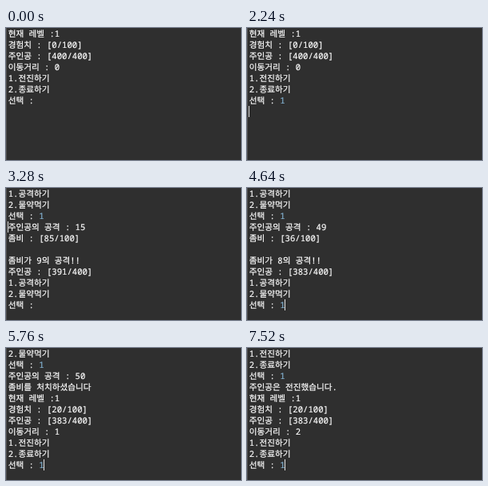
An HTML page for the animation above (8000 ms loop, 294x166 px).

```html
<!DOCTYPE html>
<html lang="ko">
<head>
<meta charset="utf-8">
<title>콘솔 게임</title>
<style>
  html, body { margin: 0; width: 100%; height: 100%; overflow: hidden; background: #2f2f2f; }
  #console {
    position: relative; width: 294px; height: 166px; overflow: hidden; background: #2f2f2f; color: #fff;
    font: 500 10.6px/14px "Noto Sans Mono", "Noto Sans CJK KR", "Noto Sans CJK", monospace;
    text-rendering: geometricPrecision;
    -webkit-text-stroke: 0.2px;
  }
  #console::before { content: ""; position: absolute; inset: 0 auto 0 0; width: 1px; background: #515151; }
  #log { position: absolute; left: 2.7px; }
  .row { height: 14px; white-space: pre; }
  .answer { color: #84b4d4; }
  #caret { position: absolute; width: 1px; height: 14px; background: #e4e4e4; }
</style>
</head>
<body>
<div id="console"><div id="log"></div><div id="caret"></div></div>
<script>
const LOOP = 8000, TICK = 80, BLINK = 560;
const LINE = 14, ROWS_ABOVE_PROMPT = 10, TEXT_DROP = 0.8;
const LINE_START = 2, PROMPT_END = 47, MENU_END = 54;
const PROMPT = "선택 : ";

const hero = { hp: 400, exp: 0, distance: 0 };
const zombie = { hp: 100 };

const status = () => [
  "현재 레벨 :1", `경험치 : [${hero.exp}/100]`, `주인공 : [${hero.hp}/400]`,
  `이동거리 : ${hero.distance}`, "1.전진하기", "2.종료하기", PROMPT];
const fightMenu = ["1.공격하기", "2.물약먹기", PROMPT];

// The echo prints on Enter; the reply follows one tick later.
function meetZombie() {
  return { echo: [], reply: ["주인공은 전진하다 좀비를 만났습니다", ...fightMenu] };
}
function trade(damage, hit) {
  zombie.hp -= damage;
  hero.hp -= hit;
  return {
    echo: [`주인공의 공격 : ${damage}`],
    reply: [`좀비 : [${zombie.hp}/100]`, "", `좀비가 ${hit}의 공격!!`,
      `주인공 : [${hero.hp}/400]`, ...fightMenu]
  };
}
function finish(damage) {
  hero.exp += 20;
  hero.distance++;
  return { echo: [`주인공의 공격 : ${damage}`], reply: ["좀비를 처치하셨습니다", ...status()] };
}
function walk() {
  hero.distance++;
  return { echo: ["주인공은 전진했습니다."], reply: status() };
}

const opening = status();
const turns = [
  { typed: 1440, entered: 2240, ...meetZombie() },
  { typed: 2880, entered: 3200, ...trade(15, 9) },
  { typed: 3680, entered: 4000, ...trade(49, 8) },
  { typed: 4640, entered: 5200, ...finish(50) },
  { typed: 5760, entered: 6960, ...walk() },
  { typed: 7520, entered: Infinity, echo: [], reply: [] }];

const transcript = [...opening, ...turns.flatMap(turn => [...turn.echo, ...turn.reply])];
const promptRows = [...transcript.keys()].filter(i => transcript[i] === PROMPT);

const log = document.getElementById("log");
const caret = document.getElementById("caret");

const rows = transcript.map(text => {
  const row = document.createElement("div");
  row.className = "row";
  row.textContent = text;
  if (text === PROMPT) {
    const answer = document.createElement("span");
    answer.className = "answer";
    answer.textContent = "1";
    row.append(answer);
  }
  log.append(row);
  return row;
});

function caretAt(time, index) {
  const { typed, entered } = turns[index];
  const row = promptRows[index];
  if (time >= entered) return { row: row + 1, x: LINE_START, since: entered };
  if (time >= typed) return { row, x: PROMPT_END, since: typed - TICK };
  if (index) return { row: promptRows[index - 1] + 1, x: LINE_START, since: turns[index - 1].entered };
  return { row: row - 1, x: MENU_END, since: 400 };
}

function draw(time) {
  const index = turns.findIndex(turn => time < turn.entered + TICK);
  const { typed, entered, echo } = turns[index];
  const promptRow = promptRows[index];
  const last = promptRow + (time >= entered ? echo.length : 0);
  const first = Math.max(0, promptRow - ROWS_ABOVE_PROMPT);

  log.style.top = `${TEXT_DROP - first * LINE}px`;
  rows.forEach((row, i) => row.style.visibility = i <= last ? "visible" : "hidden");
  rows[promptRow].lastChild.style.display = time >= typed ? "inline" : "none";
  promptRows.slice(0, index).forEach(i => rows[i].lastChild.style.display = "inline");

  const { row, x, since } = caretAt(time, index);
  const lit = Math.floor((time - since) / BLINK) % 2 === 0;
  caret.style.visibility = lit ? "visible" : "hidden";
  caret.style.left = `${x}px`;
  caret.style.top = `${(row - first) * LINE}px`;
}

const origin = performance.now();
function tick() {
  draw((performance.now() - origin) % LOOP);
  requestAnimationFrame(tick);
}
tick();
</script>
</body>
</html>
```
